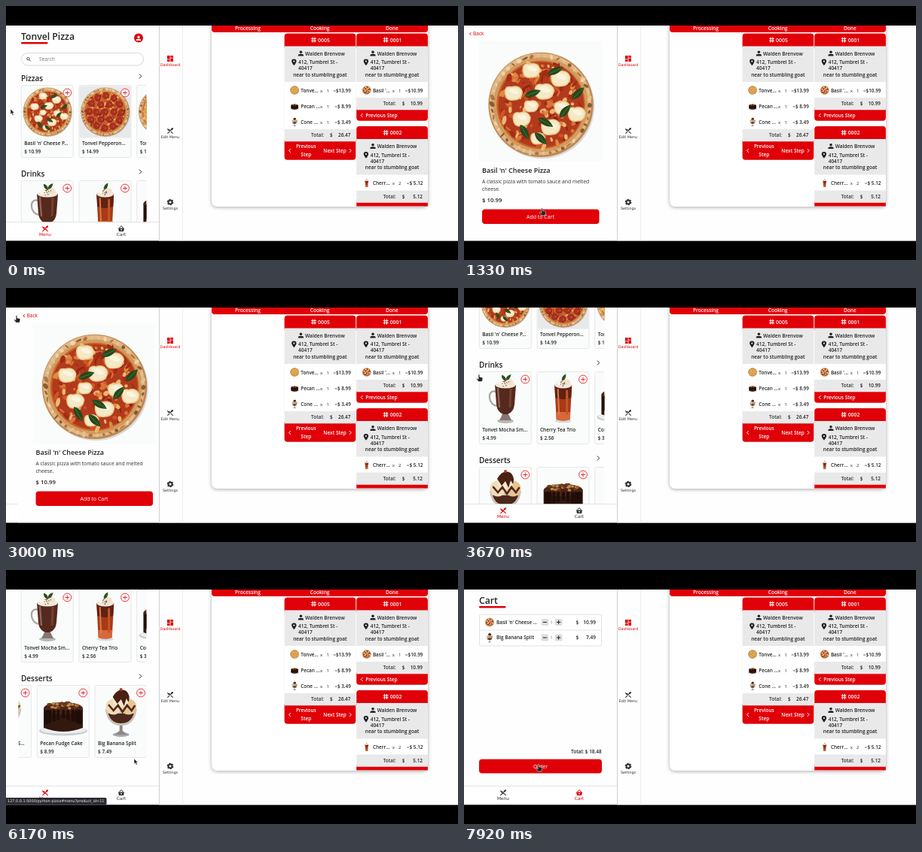
Write an HTML page that moves like this. It is 600x338 px and loops after 8000 ms.

```html
<!DOCTYPE html>
<html lang="en">
<head>
<meta charset="utf-8">
<title>Pizza ordering demo</title>
<style>
  html, body { margin: 0; width: 100%; height: 100%; overflow: hidden; background: #000; }
  svg { display: block; width: 100vw; height: 100vh; }
  text { font-family: "Open Sans", "Noto Sans", sans-serif; fill: currentColor; white-space: pre; }
  .ui { font-family: "DejaVu Sans", sans-serif; }
  .b { font-weight: 600; }
  .c { text-anchor: middle; }
  .r { text-anchor: end; }
</style>
</head>
<body>
<script>
const RED = '#e00008', INK = '#222', GREY = '#e9e9e9', PAPER = '#fefefe';
const TOP = 26, HEIGHT = 286.4;

// Drawing helpers
const text = (x, y, size, str, cls = '', color = INK) =>
  `<text x="${x}" y="${y}" font-size="${size}" class="${cls}" color="${color}">${str}</text>`;
const rect = (x, y, w, h, fill, r = 0, extra = '') =>
  `<rect x="${x}" y="${y}" width="${w}" height="${h}" rx="${r}" fill="${fill}" ${extra}/>`;
const disc = (x, y, r, fill, extra = '') => `<circle cx="${x}" cy="${y}" r="${r}" fill="${fill}" ${extra}/>`;
const oval = (x, y, rx, ry, fill, turn = 0) =>
  `<ellipse rx="${rx}" ry="${ry}" fill="${fill}" transform="translate(${x} ${y}) rotate(${turn})"/>`;
const path = (d, fill, extra = '') => `<path d="${d}" fill="${fill}" ${extra}/>`;
const line = (d, color, w = 1) => path(d, 'none', `stroke="${color}" stroke-width="${w}" stroke-linecap="round"`);
const group = (content, extra = '') => `<g ${extra}>${content}</g>`;
const at = (x, y, content, scale = 1) => group(content, `transform="translate(${x} ${y}) scale(${scale})"`);
const chevron = (x, y, dir, color, s = 2.1) =>
  line(`M${x - dir * s / 2} ${y - s}l${dir * s} ${s}l${-dir * s} ${s}`, color, 1);
const food = (id, x, y, scale = 1) => `<use href="#${id}" transform="translate(${x} ${y}) scale(${scale})"/>`;

let seed = 7;
const random = () => (seed = seed * 16807 % 2147483647) / 2147483647;
const pick = list => list[random() * list.length | 0];
const scatter = (n, radius, draw) => Array.from({ length: n }, () => {
  const a = random() * 6.283, d = Math.sqrt(random()) * radius;
  return draw(d * Math.cos(a), d * Math.sin(a));
}).join('');
const ring = (n, radius, draw) => Array.from({ length: n }, (_, i) =>
  draw(radius * Math.cos(i * 6.283 / n + radius), radius * Math.sin(i * 6.283 / n + radius))).join('');

// Food
const pizzaBase = (sauce, specks) =>
  oval(.8, 1, 32.3, 32.3, '#0002') + disc(0, 0, 32.4, '#c08850') + disc(-.3, -.4, 31.5, '#deb787') + disc(0, 0, 29.3, '#d39a5c') +
  ring(46, 30.2, (x, y) => oval(x, y, .6 + random() * 1.5, .4 + random(), pick(['#efd3a8', '#b27540', '#e6c190', '#8d5a30']), x * 40)) +
  disc(0, 0, 27.3, '#c4622c') + disc(.2, 0, 26.4, sauce) +
  scatter(190, 26.5, (x, y) => oval(x, y, .8 + random() * 2.2, .5 + random(), pick(specks), random() * 180));

const blob = (x, y, s) => path(`M${x - s} ${y}q${-s * .1} ${-s} ${s * .8} ${-s * .8}q${s} ${-s * .3} ${s * 1.3} ${s * .6}` +
  `q${-s * .1} ${s} ${-s} ${s}q${-s} ${s * .2} ${-s * 1.1} ${-s * .8}z`, '#f5e9c6', 'stroke="#ecc98a" stroke-width=".7"') +
  oval(x + s * .1, y - s * .25, s * .6, s * .3, '#fbf5df', 20);
const leaf = (x, y, turn) => at(x, y, group(
  path('M-5.3 0Q-1 -4.4 5.3 0Q-1 4 -5.3 0', '#25481c') + line('M-4 0H4', '#50763b', .4), `transform="rotate(${turn})"`));

const margherita = pizzaBase('#b23a1c', ['#dc8a42', '#8f2413', '#cf5527', '#eab873', '#a52a14', '#d9743a']) +
  [[-6, -21, 5], [12, -16, 5.5], [-17, -7, 5], [2, -8, 5.5], [-6, 1, 4], [-12, 9, 5], [22, 6, 5], [6, 14, 5.5], [13, 2, 4.5], [-2, 21, 4]]
    .map(p => blob(...p)).join('') +
  [[9, -21, -25], [-5, -7, -20], [23, -7, -45], [15, 4, -50], [0, 21, 45], [3, 11, 30], [-10, 17, 60]]
    .map(p => leaf(...p)).join('');

const slice = (x, y) => disc(x, y, 4.4, '#8a2018') + disc(x - .2, y - .3, 3.8, '#ab3022') + disc(x + 1, y, 1, '#cc5a3c');
const pepperoni = pizzaBase('#c8602c', ['#eab25c', '#a8361a', '#e39a4c', '#8f2a16']) +
  ring(12, 21.5, slice) + ring(6, 11.5, slice) + slice(0, 0);

const pie = pizzaBase('#d9a047', ['#e8bd6a', '#b9762c', '#f0cf86']);

const cream = (y, w) => oval(0, y, w, 4.5, '#f1e8da') + oval(-w * .35, y - 3.5, w * .5, 3.5, '#fbf6ec') +
  oval(w * .3, y - 4, w * .5, 4, '#efe2cd') + scatter(9, 4, (x, dy) => disc(x * 1.6, y - 2 + dy, .7, '#6b3a20'));

const mug = path('M-12 -9C-25 -14 -24 10 -10 10', 'none', 'stroke="#a9a5a3" stroke-width="2.2"') +
  path('M-14 -18H14L12 8Q11 18 3 21V27H-3V21Q-11 18 -12 8Z', '#55291d') +
  path('M-10 -14L-8 12', 'none', 'stroke="#936252" stroke-width="2.4"') + path('M7 -13L6 12', 'none', 'stroke="#74402f" stroke-width="3"') +
  oval(0, 30, 11, 3, '#b9b5b3') + path('M-4 21H4L8 29H-8Z', '#847773') +
  cream(-18, 13.5) + leaf(-2, -27, 55) + leaf(4, -28, -50);

const tea = oval(0, 30, 11, 2.5, '#0002') + path('M-11.5 -18H11.5L9 28Q0 31 -9 28Z', '#a83a15') +
  path('M-11.5 -18H11.5L10.5 -1Q0 3 -10.5 -1Z', '#5f2213') + path('M-9.6 18H9.6L9 28Q0 31 -9 28Z', '#d8683a') +
  line('M-7 -12L-5.5 22', '#db7b4a', 2) + line('M5 -10L5 20', '#c4552a', 3) + cream(-18, 11.5) + leaf(1, -28, -60);

const cake = oval(0, 25, 32, 6.5, '#c9cdd1') + oval(0, 24, 30, 5, '#eceef0') +
  path('M-26 -5V21Q0 31 26 21V-5Z', '#32180f') + oval(0, -5, 26, 8, '#4a2416') +
  ring(11, 23, x => line(`M${x} -1v${8 + Math.abs(x) / 3}`, '#1f0d08', 4)) +
  scatter(32, 20, (x, y) => oval(x, -9 + y * .22, 2.3, 1.8, pick(['#9a5e2d', '#c18a4c', '#6c3b1b'])));

const sundae = oval(0, 30, 11, 3, '#a5a8aa') + path('M-2 14H2V25L8 30H-8L-2 25Z', '#8b8784') +
  path('M-21 -4H21Q18 18 0 18Q-18 18 -21 -4Z', '#c9bfb6') + path('M-17 2H17Q13 15 0 15Q-13 15 -17 2Z', '#4b281a') +
  disc(-10, -7, 10.5, '#f0dcb8') + disc(10, -7, 10.5, '#e6c692') + disc(0, -17, 11, '#f6e8cd') +
  path('M-11 -20Q-4 -33 7 -28Q13 -22 10 -13L7 -18L4 -8L0 -17L-5 -11Z', '#4a2114') +
  line('M-16 -9L-10 -2L-4 -9L2 0L8 -9L14 -2L18 -8', '#55271a', 2.6) + disc(0, -30, 2, '#b23a2c');

// Icons, centred on the origin and coloured by currentColor
const CUR = 'currentColor';
const utensils = line('M-3.3 3.3L2.5 -2.5M3.3 3.3L-1.5 -1.5', CUR, 1.1) +
  oval(2.4, -2.4, 1.9, 1.2, CUR, -45) + path('M-3.8 -3.6L-.6 -.4L-1.6 .6Q-4.4 -1.4 -3.8 -3.6Z', CUR);
const basket = path('M-4 -.8H4L3 3.6H-3Z', CUR) + line('M-2.4 -1L-.6 -3.4H.6L2.4 -1', CUR, 1) + disc(0, 1.4, .9, '#fff');
const person = disc(0, -2, 2, CUR) + path('M-4 4V3Q-4 .8 0 .8Q4 .8 4 3V4Z', CUR);
const pin = path('M0 4.5Q-3.2 .6 -3.2 -1.2A3.2 3.2 0 0 1 3.2 -1.2Q3.2 .6 0 4.5Z', CUR) + disc(0, -1.2, 1.1, GREY);
const tiles = rect(-4, -4, 3.6, 4.6, CUR) + rect(.4, -4, 3.6, 2.8, CUR) + rect(-4, 1.3, 3.6, 2.7, CUR) + rect(.4, -.5, 3.6, 4.5, CUR);
const gear = disc(0, 0, 2.5, 'none', 'stroke="currentColor" stroke-width="2"') +
  disc(0, 0, 3.7, 'none', 'stroke="currentColor" stroke-width="1.3" stroke-dasharray="1.94"');
const hash = line('M-3 -1.4H3M-3 1.4H3M-1.4 -3.2V3.2M1.4 -3.2V3.2', CUR, 1);

// Menu page
const title = str => text(20, 45, 12.2, str, 'b') + rect(20, 48, 35.5, 2.4, RED, 1.2);

function card(x, y, [name, price, image]) {
  const plus = `stroke="${RED}" stroke-width=".8"`;
  return rect(x, y, 69, 96, '#fafbfb', 2, 'stroke="#e2e2e2" stroke-width=".8"') +
    (image === 'pepperoni' ? rect(x + .5, y + 1, 68, 69, '#e8e9eb') : '') +
    food(image, x + 34.7, y + 35.5) +
    disc(x + 61, y + 10, 5.4, '#fff', plus) + path(`M${x + 58} ${y + 10}h6m-3 -3v6`, 'none', plus) +
    text(x + 4, y + 79, 6.5, name, 'b') + text(x + 4, y + 90.5, 6.5, '$ ' + price, 'b');
}
const section = (i, name, items) => {
  const y = 99.5 + 127 * i;
  return text(20, y, 10, name, 'b') + chevron(178.5, y - 6, 1, INK, 2.6) +
    group(group(items.map((item, n) => card(20.3 + 76.7 * n, y + 6, item)).join(''), `id="row${i}"`), 'clip-path="url(#rowClip)"');
};
const menu = title('Tonvel Pizza') + disc(176, 42.5, 6, RED) + at(176, 42.8, group(person, 'color="#fff"'), .8) +
  rect(20.5, 62.5, 162, 16.5, '#fff', 8.2, 'stroke="#cfcfcf" stroke-width=".8"') +
  disc(29.4, 70.2, 1.7, 'none', `stroke="${INK}" stroke-width=".8"`) + line('M30.8 71.6l1.7 1.7', INK, .9) +
  text(44, 73.2, 6.6, 'Search', '', '#777') +
  section(0, 'Pizzas', [["Basil 'n' Cheese P...", '10.99', 'margherita'], ['Tonvel Pepperon...', '14.99', 'pepperoni'], ['Tonvel Feast', '13.99', 'pie']]) +
  section(1, 'Drinks', [['Tonvel Mocha Sm...', '4.99', 'mug'], ['Cherry Tea Trio', '2.56', 'tea'], ['Cone Coffee', '3.49', 'cake']]) +
  section(2, 'Desserts', [['Tonvel Sundae S...', '9.49', 'sundae'], ['Pecan Fudge Cake', '8.99', 'cake'], ['Big Banana Split', '7.49', 'sundae']]);

const tab = (id, x, icon, label) => group(at(x, 296.3, icon) + text(x, 306, 5.8, label, 'ui c', CUR), `id="${id}"`);
const nav = rect(0, 288, 203, 24, '#fff') + rect(0, 287.2, 203, .8, '#ddd') +
  tab('menuTab', 52, utensils, 'Menu') + tab('cartTab', 153, basket, 'Cart');

// Product page
const detail = rect(0, TOP, 203, HEIGHT, PAPER) + chevron(8.3, 37, -1, RED, 1.6) + text(12, 39.4, 6.6, 'Back', '', RED) +
  rect(20, 47, 163, 160, '#fafbfb') + food('margherita', 102, 131.4, 2.15) +
  text(24, 222, 9, "Basil 'n' Cheese Pizza", 'b') +
  text(24, 236, 6.8, 'A classic pizza with tomato sauce and melted', '', '#333') + text(24, 246.3, 6.8, 'cheese.', '', '#333') +
  text(24, 261.2, 7.8, '$ 10.99', 'b') +
  rect(24, 270.5, 155.5, 19.5, RED, 4) +
  group(line('M175.5 271.8q2.3 .6 2.3 3v11q0 2.4 -2.3 3', '#8d0005', .9), 'id="press"') +
  text(101.5, 282.8, 7, 'Add to Cart', 'c', '#fff');

// Cart page
function cartRow(y, image, scale, name, price) {
  const button = (x, sign) => rect(x, y - 4.6, 9.6, 9.2, '#dedede', 1.5) + path(`M${x + 2.2} ${y}h5.2${sign}`, 'none', `stroke="${INK}" stroke-width="1"`);
  return food(image, 34, y, scale) + text(43, y + 2.3, 6.4, name, 'b') + button(102.6, '') + button(120.8, 'm-2.6 -2.6v5.2') +
    text(116, y + 2.3, 6, '1', 'c', '#777') + text(148.5, y + 2.3, 6.5, '$', 'b') + text(175, y + 2.3, 6.5, price, 'b r');
}
const cart = rect(0, TOP, 203, 262, PAPER) + title('Cart') +
  rect(20.5, 59.3, 162, 41.6, '#fff', 1.5, 'stroke="#dadada" stroke-width=".8"') + rect(21, 79.7, 161, .7, '#ddd') +
  cartRow(69.5, 'margherita', .18, "Basil 'n' Cheese ...", '10.99') + cartRow(90, 'sundae', .2, 'Big Banana Split', '7.49') +
  text(182.8, 244, 6.5, 'Total: $ 18.48', 'b r') + rect(20, 251.7, 163, 18.8, RED, 4) + text(101.5, 263.7, 7, 'Order', 'c', '#fff');

// Kitchen dashboard
const side = (y, icon, label, color) => group(at(218, y, icon) + text(218, y + 10, 4.9, label, 'ui c', CUR), `color="${color}"`);

function order(x, y, number, rows, total, canAdvance) {
  const grey = y + 64.5 + rows.length * 21, foot = grey + 16.3, tall = canAdvance ? 24.5 : 14.5;
  const item = ([image, name, count, price], i) => {
    const base = y + 78 + i * 21;
    return food(image, x + 13.5, base - 2.5, .18) + text(x + 21.7, base, 6.4, name, 'b') + text(x + 47.5, base, 6, 'x') +
      text(x + 57.5, base, 6, count, 'c') + text(x + 88.3, base, 6.4, '<tspan fill="#888">=</tspan>' + price, 'b r');
  };
  return rect(x, y, 94.7, 22, RED, 4) + rect(x, foot - 5, 94.7, tall + 5, RED, 4) +
    rect(x, y + 17, 94.7, foot - y - 17, GREY) + rect(x, y + 64.5, 94.7, grey - y - 64.5, '#fff') +
    at(x + 38.9, y + 8.5, group(hash, 'color="#fff"')) + text(x + 44.5, y + 11, 6.9, number, 'b', '#fff') +
    at(x + 21.8, y + 26.5, group(person, `color="${INK}"`), .9) + text(x + 27.5, y + 29, 6.5, 'Walden Brenvow', 'b') +
    at(x + 12.7, y + 38.3, group(pin, `color="${INK}"`)) + text(x + 18.5, y + 40.5, 6.5, '412, Tumbrel St -', 'b') +
    text(x + 18.5, y + 48.7, 6.5, '40417', 'b') + text(x + 47.3, y + 57, 6.5, 'near to stumbling goat', 'b c') +
    rows.map(item).join('') +
    text(x + 35.5, grey + 10.3, 6.4, 'Total:', 'b', '#333') +
    text(x + 60.5, grey + 10.3, 6.4, '$', 'b') + text(x + 87.8, grey + 10.3, 6.4, total, 'b r') +
    chevron(x + 7, foot + tall / 2, -1, '#fff') +
    (canAdvance
      ? text(x + 28.7, foot + 9, 6.5, 'Previous', 'b c', '#fff') + text(x + 28.7, foot + 19.3, 6.5, 'Step', 'b c', '#fff') +
        text(x + 67, foot + 14.6, 6.5, 'Next Step', 'b c', '#fff') + chevron(x + 87.5, foot + 12.2, 1, '#fff')
      : text(x + 12, foot + 9.7, 6.5, 'Previous Step', 'b', '#fff'));
}
const board = rect(203, TOP, 397, HEIGHT, PAPER) + rect(203, TOP, 1, HEIGHT, '#cfcfcf') + rect(234, TOP, .7, HEIGHT, '#e6e6e6') +
  side(70, tiles, 'Dashboard', RED) + side(166, utensils, 'Edit Menu', '#333') + side(261, gear, 'Settings', '#333') +
  group(rect(273, 10, 287, 257, '#fff', 7, 'style="filter:drop-shadow(0 1px 2.5px #0005)"') +
    rect(273, 15, 287, 20, RED, 4) +
    ['Processing', 'Cooking', 'Done'].map((name, i) => text(321 + 95.7 * i, 32, 6.6, name, 'b c', '#fff')).join(''), 'clip-path="url(#page)"') +
  group(order(369.6, 36.5, '0005', [['pie', 'Tonve...', 1, '$13.99'], ['cake', 'Pecan ...', 1, '$ 8.99'], ['sundae', 'Cone ...', 1, '$ 3.49']], '26.47', true) +
    order(465.2, 36.5, '0001', [['margherita', "Basil '...", 1, '$10.99']], '10.99') +
    order(465.2, 160, '0002', [['tea', 'Cherr...', 2, '$ 5.12']], '5.12'), 'clip-path="url(#boardClip)"');

const arrow = path('M0 0V7.2L1.7 5.7L2.9 8.4L4.2 7.8L3 5.2H5.2Z', '#222', 'stroke="#fff" stroke-width=".5"');
const hand = path('M-.9 .4Q0 -.6 .8 .4V3.4L4 4Q5 4.4 4.8 6L4 9.5H-.8L-3.4 6Q-3.2 4.8 -2 5.4L-.9 6.4Z', '#222', 'stroke="#fff" stroke-width=".5"');
const clip = (id, x, y, w, h) => `<clipPath id="${id}">${rect(x, y, w, h, '#000')}</clipPath>`;
const symbols = Object.entries({ margherita, pepperoni, pie, mug, tea, cake, sundae })
  .map(([id, art]) => group(art, `id="${id}"`)).join('');

document.body.innerHTML = `<svg viewBox="0 0 600 338"><defs>${symbols}
  ${clip('page', 0, TOP, 600, HEIGHT)}${clip('left', 0, TOP, 203, HEIGHT)}${clip('view', 0, TOP, 203, 262)}
  ${clip('rowClip', 16.5, 0, 169.8, 600)}${clip('boardClip', 273, TOP, 288, 240.5)}</defs>` +
  rect(0, 0, 600, 338, '#000') + rect(0, TOP, 600, HEIGHT, PAPER) +
  group(group(menu, 'id="menu"'), 'clip-path="url(#view)"') +
  group(group(cart, 'id="cart"'), 'clip-path="url(#view)"') + nav +
  group(group(detail, 'id="detail"'), 'clip-path="url(#left)"') + board +
  group(rect(-2, 303, 135.5, 9.5, '#2b2b33', 1.5) + text(2, 309.4, 4.95, '127.0.0.1:5000/python-pizza#menu?product_id=<tspan id="product">10</tspan>', 'ui', '#eee'), 'id="status"') +
  group(group(arrow, 'id="arrow"') + group(hand, 'id="hand"'), 'id="cursor"') + '</svg>';

// Motion
const $ = id => document.getElementById(id);
const move = (id, x, y = 0) => $(id).setAttribute('transform', `translate(${x} ${y})`);
const show = (id, on) => $(id).style.display = on ? '' : 'none';
const clamp = p => Math.min(1, Math.max(0, p));
const smooth = p => clamp(p) ** 2 * (3 - 2 * clamp(p));
const slide = (t, start) => 203 * (1 - clamp((t - start) / 420)) ** 3;

// time, x, y, pointing hand
const cursorKeys = [
  [0, 6, 137, 0], [100, 6, 137, 0], [500, 84, 153, 1], [950, 84, 153, 1], [1400, 105, 277, 1], [1650, 105, 277, 1],
  [2080, 29, 137, 0], [2600, 14, 36, 1], [2980, 14, 36, 1], [3400, 20, 115, 1], [4150, 20, 115, 1], [4450, 150, 186, 1],
  [4800, 125.5, 183, 1], [5000, 125.5, 183, 1], [5400, 180, 161, 1], [5750, 180, 161, 0], [6170, 170, 251, 0],
  [6500, 153, 296, 1], [6950, 153, 296, 1], [7650, 99, 258.5, 1], [8000, 99, 258.5, 1]];

function draw(t) {
  const i = cursorKeys.findIndex(k => k[0] > t), [t0, x0, y0, pointing] = cursorKeys[i - 1], [t1, x1, y1] = cursorKeys[i];
  const p = smooth((t - t0) / (t1 - t0));
  move('cursor', x0 + (x1 - x0) * p, y0 + (y1 - y0) * p);
  show('hand', pointing);
  show('arrow', !pointing);

  move('detail', t < 2990 ? slide(t, 660) : 203 - slide(t, 2990));
  move('cart', slide(t, 6700));
  move('menu', 0, -121 * smooth((t - 3480) / 190) - 85 * smooth((t - 3720) / 330));
  move('row2', -55.7 * smooth((t - 4430) / 330));

  show('press', t > 1600 && t < 2250);
  show('status', t > 4000 && t < 6300);
  $('product').textContent = t < 5300 ? 10 : 11;
  $('menuTab').style.color = t < 6700 ? RED : '#333';
  $('cartTab').style.color = t < 6700 ? '#333' : RED;
}
(function frame() {
  draw(performance.now() % 8000);
  requestAnimationFrame(frame);
})();
</script>
</body>
</html>
```
